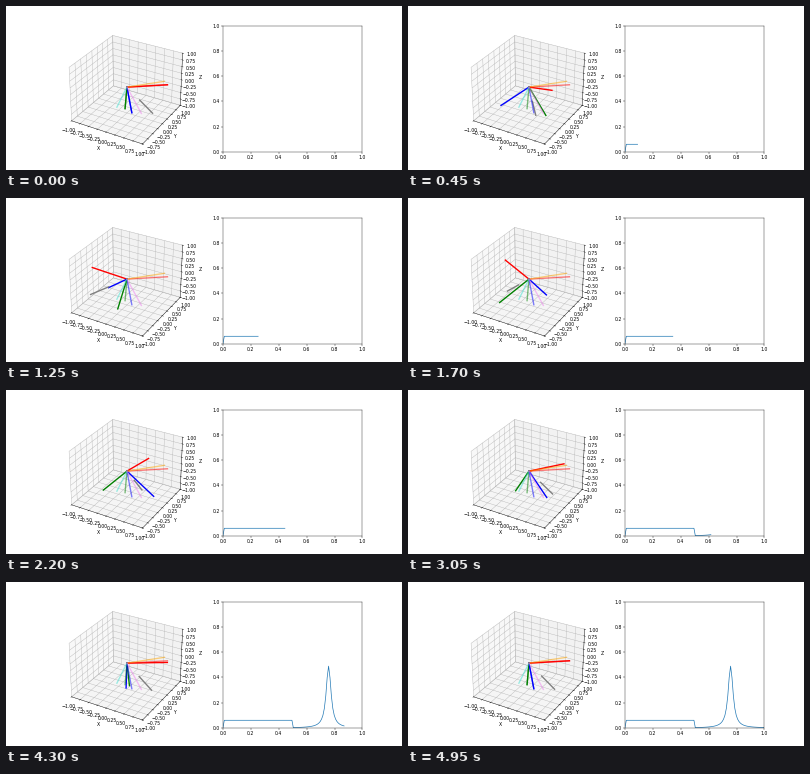
Recreate the animation shown at these times as a matplotlib script. Size 396 by 164 pixels, loop 5 s.

```python
import numpy as np
import matplotlib.pyplot as plt
from matplotlib.animation import FuncAnimation

DPI = 33
FRAMES = 100
HALF = FRAMES // 2


def unit(v):
    return np.asarray(v, float) / np.linalg.norm(v)


def rotation(axis, angle):
    """Rodrigues rotation matrix."""
    x, y, z = unit(axis)
    k = np.array([[0, -z, y], [z, 0, -x], [-y, x, 0]])
    return np.eye(3) + np.sin(angle) * k + (1 - np.cos(angle)) * k @ k


# Start orientation, and the fixed axis that carries it to the end orientation
start = rotation((0.970, 0.237, 0.059), np.pi + 0.034)
turn_axis = (-0.213, 0.785, 0.582)
slope = 12.25
arc = 2 * np.arctan(slope)  # angle between the two quaternions

# Spherical interpolation there, normalised linear interpolation back
s = np.linspace(0, 1, HALF)
there = arc * s
back = arc / 2 - np.arctan((2 * s - 1) * slope)
phase = np.concatenate([there, back])
speed = np.abs(np.diff(phase, prepend=0))
time = np.linspace(0, 1, FRAMES)


def pose(phi):
    return rotation(turn_axis, 2 * phi) @ start


def segment(tip, base=0.0):
    """Coordinates of a line from base * tip to tip."""
    return np.outer(tip, (base, 1.0))


fig = plt.figure(figsize=(396 / DPI, 164 / DPI), dpi=DPI)
space = fig.add_subplot(121, projection="3d")
ticks = np.linspace(-1, 1, 9)
space.set(xlim=(-1, 1), ylim=(-1, 1), zlim=(-1, 1),
          xticks=ticks, yticks=ticks, zticks=ticks,
          xlabel="X", ylabel="Y", zlabel="Z")

graph = fig.add_subplot(122)
graph.set(xlim=(0, 1), ylim=(0, 1))
curve, = graph.plot([], [])


def draw_triad(matrix, colors, alpha=1.0):
    return [space.plot(*segment(tip), color=c, lw=3, alpha=alpha)[0]
            for tip, c in zip(matrix.T, colors)]


triad = draw_triad(start, ("red", "green", "blue"))
diagonal, = space.plot(*segment(start @ unit((1, 1, 1)), 0.5),
                       color="gray", lw=3)
draw_triad(start, ("red", "green", "blue"), 0.5)
draw_triad(pose(arc), ("orange", "turquoise", "violet"), 0.5)


def update(i):
    matrix = pose(phase[i])
    for line, tip in zip(triad, matrix.T):
        line.set_data_3d(*segment(tip))
    diagonal.set_data_3d(*segment(matrix @ unit((1, 1, 1)), 0.5))
    curve.set_data(time[:i + 1], speed[:i + 1])
    return [*triad, diagonal, curve]


def reset():
    return update(0)


anim = FuncAnimation(fig, update, frames=FRAMES, init_func=reset,
                     interval=50, repeat=True, repeat_delay=0)
plt.show()
```
